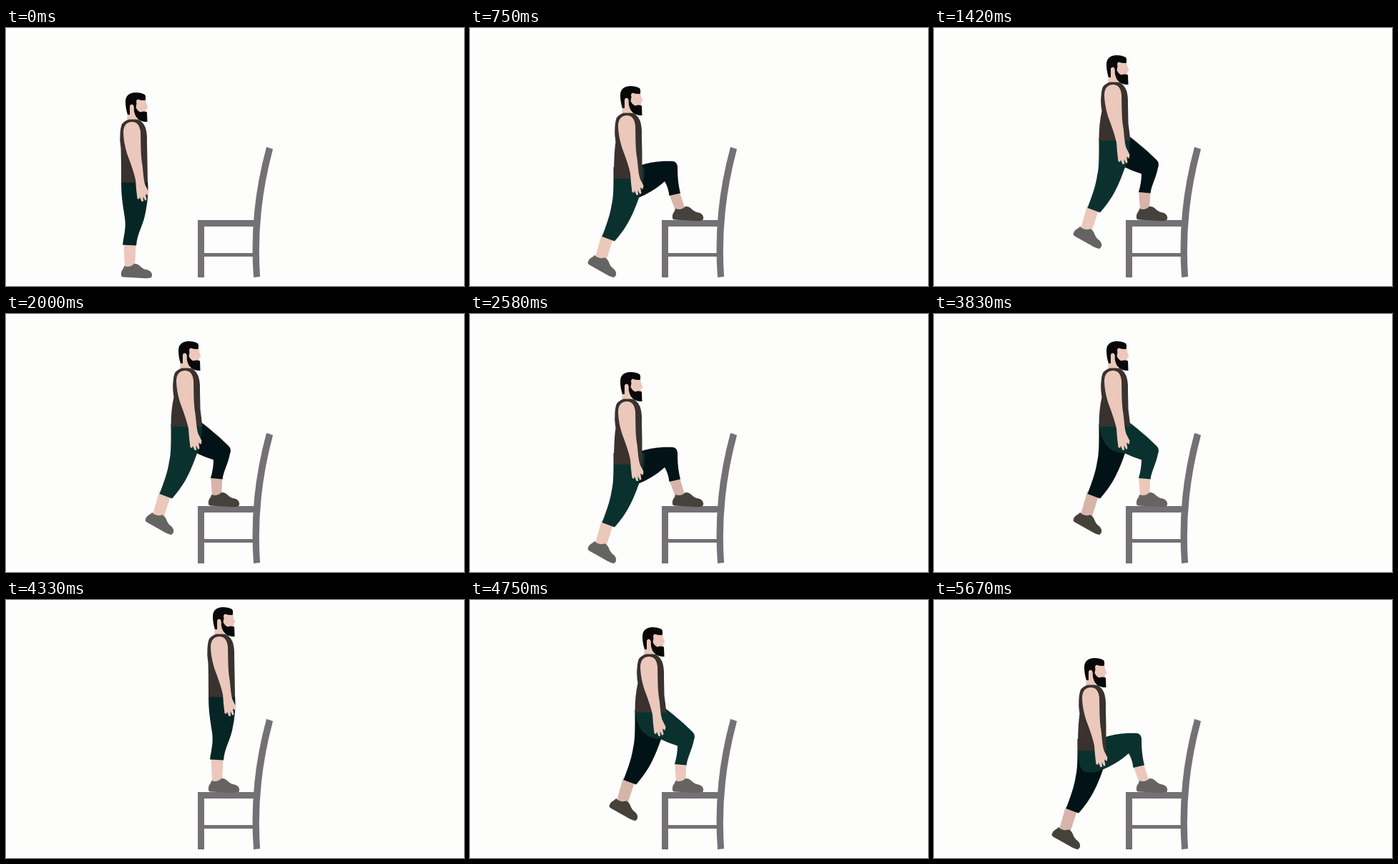
Write an HTML page that moves like this. It is 640 px wide and 360 px high and loops after 5760 ms.

```html
<!DOCTYPE html>
<html lang="en">
<head>
<meta charset="utf-8">
<title>Chair step-up</title>
<style>
  html, body { margin: 0; width: 100%; height: 100%; overflow: hidden; background: #fdfdfc; }
  svg { display: block; width: 100%; height: 100%; }
  .near { --cloth: #0b312f; --skin: #ebc8bb; --shoe: #656463; }
  .far { --cloth: #021317; --skin: #d7b4aa; --shoe: #45423b; }
  .stand { --cloth: #062626; }
  .cloth { fill: var(--cloth); }
  .skin { fill: var(--skin); }
  .shoe { fill: var(--shoe); }
  .shirt { fill: #39322f; }
  .hair { fill: #080809; }
  .chair { fill: #737175; }
</style>
</head>
<body>
<svg viewBox="0 0 640 360">
  <g class="chair">
    <path d="M364 166L373 169Q349 258 355 347L346 348Q339 257 364 166Z"/>
    <path d="M268 268H348V277H277V348H268Z"/>
    <path d="M276 314H347V319H276Z"/>
  </g>
  <g id="figure"></g>
</svg>
<script>
const LOOP = 5760;
const figure = document.getElementById('figure');

const path = (cls, d) => `<path class="${cls}" d="${d}"/>`;
const group = (cls, x, y, body) => `<g class="${cls}" transform="translate(${x} ${y})">${body}</g>`;

const shoe = path('shoe',
  'M161 345C160 338 165 336 165 332Q173 335 179 329C186 328 188 335 195 337' +
  'C203 338 206 344 203 348Q199 350 190 349L164 347.5Q161 347 161 345Z');

const straightLeg =
  path('skin', 'M164.500 301H181.500L180 334H166Z') + shoe +
  path('cloth', 'M161 213H198Q200 235 194 262C190 279 184 285 182 303.500L163 302.500' +
    'C165 288 168 279 166 265C163 245 161 235 161 213Z');

// Trailing leg, placed for the high lunge
const backLeg =
  path('skin', 'M214 248L230 254L220 285L205 280Z') +
  `<g transform="translate(194.3 287.7) rotate(26) translate(-161 -346)">${shoe}</g>` +
  path('cloth', 'M230.500 154H274Q274 180 266 197C259 217 250 238 232 257.500L214.500 251' +
    'C221 234 226 220 228 206C231 195 230.500 175 230.500 154Z');

const frontShoe = group('', 122, -80, shoe);

const highFront =
  path('skin', 'M286 227H302.500L301 254H288Z') + frontShoe +
  path('cloth', 'M231 152H274C287 162 301 174 311 184Q315.500 188 313 195C310 210 304 219 302.500 230.500' +
    'L286 229Q290 215 290 203.500Q278 200 266 194C246 194 232 180 231 152Z');

const lowFront =
  path('skin', 'M278 231L293 229L301 254L287 255Z') + frontShoe +
  path('cloth', 'M201 200L239 191.500C255 186 270 185.500 284 186Q289 187 290 193C290 208 291 218 294 230.500' +
    'L278.500 234Q277 222 272 214C260 225 247 232 232 238Q219 243 209 239Q201 235 201 200Z');

const head =
  path('skin', 'M170 108H183V122L181 133H169Z') +
  path('skin', 'M177 98H195L196 105L198.500 111L196 113V121H178Z') +
  path('hair', 'M170 121C168 115 167 109 167 103C167 95 172 90 181 90Q189 90 194 93' +
    'Q196 96 194.500 101Q188 101 184 99.500Q181 101 182.500 105L181.500 111Q184 116 188 117.500' +
    'Q192 115.500 197 117.500L197.500 131Q187 131 182.500 125Q179 120 178.500 112' +
    'L177 107Q173 106 173 111V121Z') +
  path('skin', 'M173 110Q174 106 177 107Q180 109 178 115Q177 119 174.500 118Z');

const torso = (left, right, hem) => path('shirt',
  `M162 134Q166 129 172 127.500H184Q191 130 194.500 138Q197.500 146 197 160L197.500 185L${right} ${hem}` +
  `H${left}Q${left} 185 160.500 168Q158.500 157 159.500 147Q160 139 162 134Z`);

const arm = path('skin',
  'M164 146C164 136 169 131 176 131C184 131 187 137 188 145C188.500 162 188 177 190.500 191' +
  'C192 203 192 211 194.500 219L199.500 229L198.500 234L195 231.500L196.500 239.500L194.500 241L191.500 235' +
  'L192 242L189.500 242L187 236L186 239L183.500 238L182 225L181 212' +
  'C179 202 175.500 193 172 183C168 173 164.500 160 164 146Z');

const upper = (x, y, left, right, hem) =>
  group('near', x, y, head + torso(left, right, hem) + arm);

const stand = (x, y) =>
  group('near stand', x, y, straightLeg) + upper(x, y, 161, 198, 215.5);

// lead: which leg is on the seat, 'near' or 'far'
function lunge(high, lead) {
  const front = group(lead, 0, 0, high ? highFront : lowFront);
  const back = group(lead === 'near' ? 'far' : 'near', high ? 0 : -30, high ? 0 : 40, backLeg);
  const legs = lead === 'near' ? back + front : front + back;
  return legs + (high ? upper(74, -52, 156.5, 200.5, 209) : upper(43, -9, 158, 197.5, 219));
}

const floor = stand(0, 0);
const seat = stand(122, -80);
const stepUp = lead => {
  const low = lunge(false, lead), high = lunge(true, lead);
  return [floor, low, high, seat, high, low];
};
const poses = [...stepUp('far'), ...stepUp('near')];
const starts = [0, 580, 1080, 1500, 2000, 2420, 2920, 3420, 3830, 4330, 4750, 5250];

let shown = -1;
function render(ms) {
  const t = ms % LOOP;
  const index = starts.filter(s => s <= t).length - 1;
  if (index !== shown) figure.innerHTML = poses[shown = index];
}

const begin = performance.now();
function tick() {
  render(performance.now() - begin);
  requestAnimationFrame(tick);
}
tick();
</script>
</body>
</html>
```
